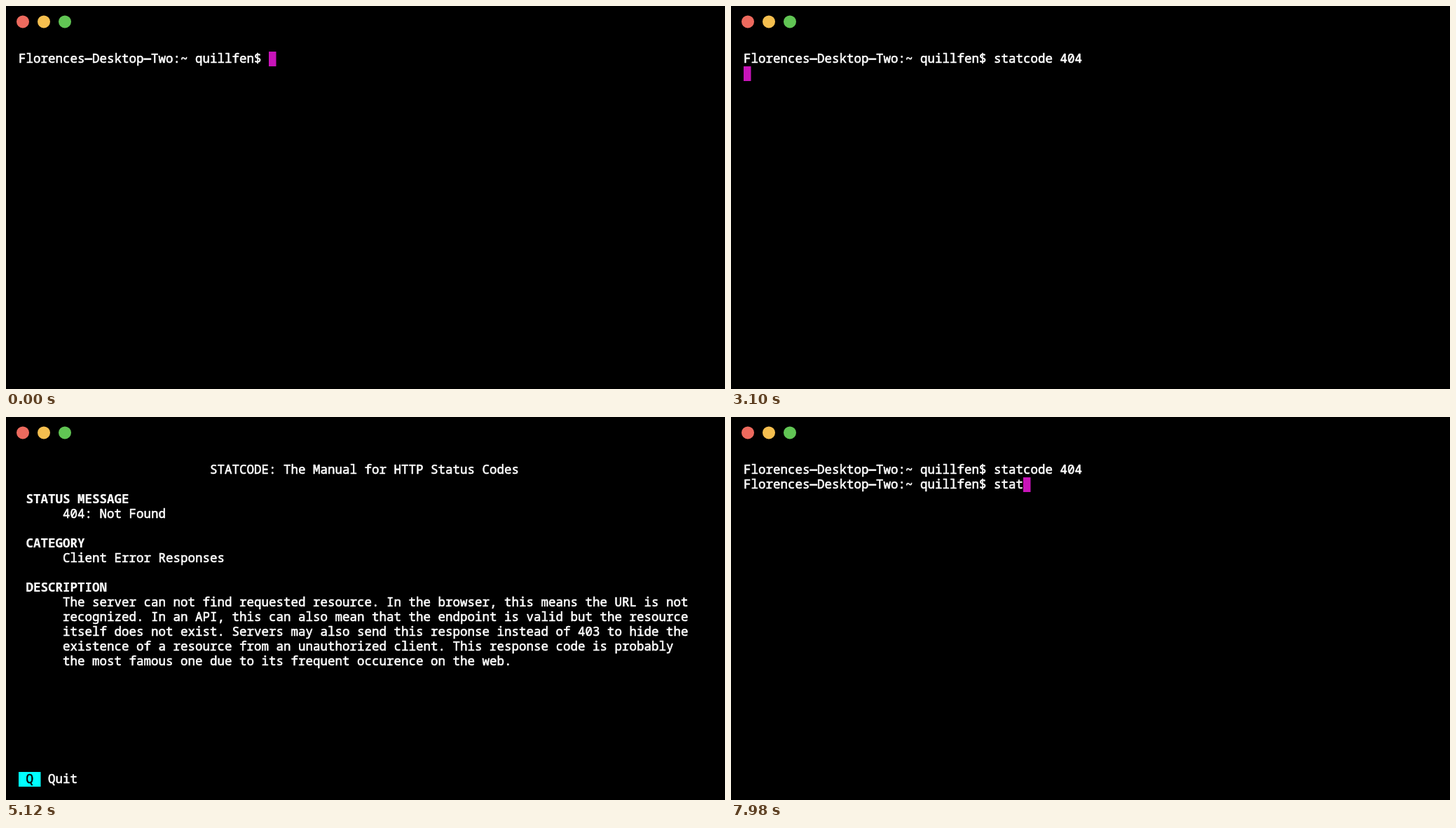
An HTML page with a canvas that plays this animation: 1026x546 px, repeating every 8 s.

```html
<!DOCTYPE html>
<html>
<head>
<meta charset="utf-8">
<style>
html, body { margin: 0; overflow: hidden; background: #000; }
canvas { display: block; }
</style>
</head>
<body>
<canvas id="stage" width="1026" height="546"></canvas>
<script>
const ctx = document.getElementById('stage').getContext('2d');
const LOOP = 8000, CELL_W = 10.5, CELL_H = 21, LEFT = 18, TOP = 65;
const PROMPT = 'Florences—Desktop—Two:~ quillfen$ ';
const COMMAND = 'statcode 404';

// Times at which each character of the command appears
const firstKeys = [160, 290, 420, 560, 720, 880, 1020, 1160, 1320, 2060, 2200, 2340];
const secondKeys = [7440, 7570, 7700, 7840];
const ENTER = 2640, OPEN = 3200, QUIT = 6900;

const description = [
  'The server can not find requested resource. In the browser, this means the URL is not',
  'recognized. In an API, this can also mean that the endpoint is valid but the resource',
  'itself does not exist. Servers may also send this response instead of 403 to hide the',
  'existence of a resource from an unauthorized client. This response code is probably',
  'the most famous one due to its frequent occurence on the web.'
];

// A thin outline gives the glyphs their medium weight
function text(str, col, row, { weight = 400, color = '#fff', outline = 0.6 } = {}) {
  const x = LEFT + col * CELL_W, y = TOP + row * CELL_H + 16;
  ctx.font = `${weight} 17.5px "Noto Sans Mono", monospace`;
  ctx.fillStyle = ctx.strokeStyle = color;
  ctx.lineWidth = outline;
  ctx.lineJoin = 'round';
  ctx.fillText(str, x, y);
  ctx.strokeText(str, x, y);
}

function heading(str, row) {
  text(str, 1, row, { weight: 700, outline: 0.2 });
}

function block(col, row, width, color) {
  ctx.fillStyle = color;
  ctx.fillRect(LEFT + col * CELL_W, TOP + row * CELL_H, width * CELL_W, CELL_H);
}

function cursor(col, row) {
  block(col, row, 1, '#c814b9');
}

function typed(keys, t) {
  return COMMAND.slice(0, keys.filter(k => k <= t).length);
}

function drawWindowButtons() {
  ['#ed6a5e', '#f5bf4f', '#61c554'].forEach((color, i) => {
    ctx.fillStyle = color;
    ctx.beginPath();
    ctx.arc(24 + 30 * i, 22.4, 9, 0, 2 * Math.PI);
    ctx.fill();
  });
}

function drawManual() {
  text('STATCODE: The Manual for HTTP Status Codes', 26, 0);
  heading('STATUS MESSAGE', 2);
  text('404: Not Found', 6, 3);
  heading('CATEGORY', 5);
  text('Client Error Responses', 6, 6);
  heading('DESCRIPTION', 8);
  description.forEach((line, i) => text(line, 6, 9 + i));
  block(0, 21, 3, '#0ff');
  text('Q', 1, 21, { color: '#000' });
  text('Quit', 4, 21);
}

function drawShell(t) {
  const first = PROMPT + typed(firstKeys, t);
  text(first, 0, 0);
  if (t < ENTER) {
    cursor(first.length, 0);
  } else if (t < OPEN) {
    cursor(0, 1);
  } else {
    const second = PROMPT + typed(secondKeys, t);
    text(second, 0, 1);
    cursor(second.length, 1);
  }
}

function draw(now) {
  const t = now % LOOP;
  ctx.fillStyle = '#000';
  ctx.fillRect(0, 0, 1026, 546);
  drawWindowButtons();
  if (t >= OPEN && t < QUIT) drawManual();
  else drawShell(t);
  requestAnimationFrame(() => draw(performance.now() - start));
}

const start = performance.now();
draw(0);
</script>
</body>
</html>
```
